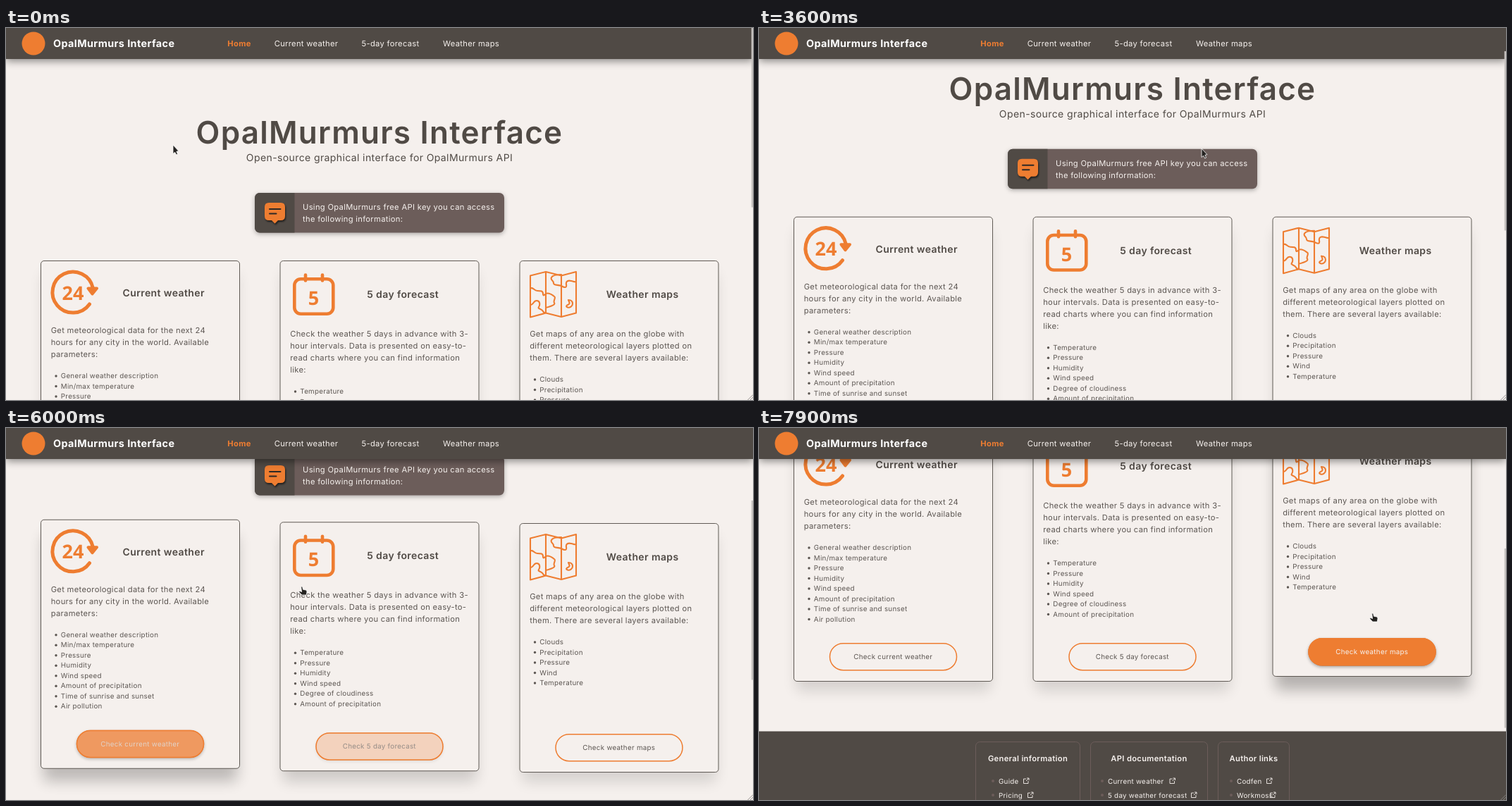
These frames come from a looping animation (1060x528 px, 8 s). An HTML page:

```html
<!DOCTYPE html>
<html lang="en">
<head>
<meta charset="utf-8">
<title>OpalMurmurs Interface</title>
<style>
html, body { margin: 0; width: 100%; height: 100%; overflow: hidden; background: #f5f0ed; }
svg { display: block; width: 1060px; height: 528px; font-family: Inter, "Open Sans", sans-serif; }
text { letter-spacing: .028em; text-rendering: geometricPrecision; white-space: pre; }
</style>
</head>
<body>
<svg id="stage" viewBox="0 0 1060 528"></svg>
<script>
const ORANGE = '#ee7d31', DARK = '#504a45', MID = '#6c5d5a', PAPER = '#f5f0ed', BODY = '#5d5753';
const NAME = 'OpalMurmurs';
const LOOP = 8000, STEP = 100;
const stage = document.getElementById('stage');

function el(parent, tag, attrs = {}, content) {
  const node = document.createElementNS('http://www.w3.org/2000/svg', tag);
  for (const k in attrs) node.setAttribute(k, attrs[k]);
  if (content !== undefined) node.textContent = content;
  parent.appendChild(node);
  return node;
}
const group = (parent, attrs) => el(parent, 'g', attrs);
const rect = (p, x, y, width, height, attrs) => el(p, 'rect', { x, y, width, height, ...attrs });
const path = (p, d, attrs) => el(p, 'path', { d, fill: 'none', ...attrs });
const text = (p, x, y, str, size, fill, attrs) =>
  el(p, 'text', { x, y, 'font-size': size, fill, ...attrs }, str);
const centred = (p, x, y, str, size, fill, weight = 400) =>
  text(p, x, y, str, size, fill, { 'text-anchor': 'middle', 'font-weight': weight });

const defs = el(stage, 'defs');
const blur = el(defs, 'filter', { id: 'blur', x: '-20%', y: '-20%', width: '140%', height: '140%' });
el(blur, 'feGaussianBlur', { stdDeviation: 10 });

// Page

rect(stage, 0, 0, 1060, 528, { fill: PAPER });
const page = group(stage);
centred(page, 530, 164, NAME + ' Interface', 44, DARK, 600);
centred(page, 530, 189, `Open-source graphical interface for ${NAME} API`, 14, DARK);

function drawNotice() {
  const g = group(page);
  rect(g, 353, 234, 354, 56.5, { rx: 7, fill: MID, style: 'filter:drop-shadow(0 2px 3px rgba(0,0,0,.3))' });
  path(g, 'M409.500 234H360a7 7 0 0 0-7 7v42.500a7 7 0 0 0 7 7h49.500z', { fill: DARK });
  path(g, 'M373 248h17q6 0 6 6v13q0 6-6 6h-4l-4.500 4.500-4.500-4.500h-4q-6 0-6-6v-13q0-6 6-6z',
    { fill: ORANGE, style: 'filter:drop-shadow(1px 2px 1px rgba(0,0,0,.6))' });
  path(g, 'M374 257h15.500M374 263.500h9.500', { stroke: '#2d2926', 'stroke-width': 2, 'stroke-linecap': 'round' });
  text(g, 421, 258, `Using ${NAME} free API key you can access`, 11.2, PAPER);
  text(g, 421, 275, 'the following information:', 11.2, PAPER);
}
drawNotice();

function clockIcon(g) {
  path(g, 'M123.300 369A29 29 0 1 0 118.500 392', { stroke: ORANGE, 'stroke-width': 5, 'stroke-linecap': 'round' });
  path(g, 'M116.500 369.500L129 369.500L122.500 377.500z',
    { fill: ORANGE, stroke: ORANGE, 'stroke-width': 4, 'stroke-linejoin': 'round' });
  digits(g, 95, '24', 385.5);
}
function calendarIcon(g) {
  rect(g, 409.3, 356.3, 55, 49.5, { rx: 9, fill: 'none', stroke: ORANGE, 'stroke-width': 4.6 });
  path(g, 'M425 350.500v8M449 350.500v8', { stroke: ORANGE, 'stroke-width': 4.6, 'stroke-linecap': 'round' });
  digits(g, 436.5, '5', 393);
}
function digits(g, x, str, y) {
  el(g, 'text', { x, y, 'text-anchor': 'middle', fill: ORANGE, 'font-size': 27, 'font-weight': 700,
    style: 'font-family:"Open Sans","Noto Sans",sans-serif;letter-spacing:0' }, str);
}
function mapIcon(g) {
  path(g, 'M744 351.500L766 346L788 351.500L809 346V404.500L788 410L766 404.500L744 410.500z' +
    'M766 346V404M788 352V410' +
    'M744 369c5-1 5 4 10 4s8 0 8 4 2 2 4 0c5-2 9 2 12 4s-2 6 0 9-5 5-12 7' +
    'M744 393c5 0 4-6 9-6s5 6 3 9 4 2 6 6 3 1 4 2' +
    'M788 350c-5 0-12 0-14 4s3 4 3 8 6 2 11 4' +
    'M788 366c5 3 8 3 7-2s3-6 7-5 5 2 7 1' +
    'M798 386c4 0 6 2 6 5.500s-4 6-7 5-2-3 1-4 1-4 0-6.500',
    { stroke: ORANGE, 'stroke-width': 2.1, 'stroke-linejoin': 'round', 'stroke-linecap': 'round' });
}

const cardData = [
  { x: 49, title: 'Current weather', titleY: 381, icon: clockIcon, bodyY: 433, listY: 497,
    body: ['Get meteorological data for the next 24', 'hours for any city in the world. Available', 'parameters:'],
    list: ['General weather description', 'Min/max temperature', 'Pressure', 'Humidity', 'Wind speed',
      'Amount of precipitation', 'Time of sunrise and sunset', 'Air pollution'],
    button: 'Check current weather' },
  { x: 388.5, title: '5 day forecast', titleY: 383, icon: calendarIcon, bodyY: 438, listY: 519,
    body: ['Check the weather 5 days in advance with 3-', 'hour intervals. Data is presented on easy-to-',
      'read charts where you can find information', 'like:'],
    list: ['Temperature', 'Pressure', 'Humidity', 'Wind speed', 'Degree of cloudiness', 'Amount of precipitation'],
    button: 'Check 5 day forecast' },
  { x: 728.5, title: 'Weather maps', titleY: 383, icon: mapIcon, bodyY: 438, listY: 502,
    body: ['Get maps of any area on the globe with', 'different meteorological layers plotted on',
      'them. There are several layers available:'],
    list: ['Clouds', 'Precipitation', 'Pressure', 'Wind', 'Temperature'],
    button: 'Check weather maps' }
];

function drawCard(c) {
  const g = group(page);
  const shade = rect(g, c.x + 4, 348, 275, 349, { rx: 6, filter: 'url(#blur)' });
  rect(g, c.x + .5, 330.5, 282, 353, { rx: 4.5, fill: PAPER, stroke: DARK, 'stroke-width': .9 });
  c.icon(g);
  centred(g, c.x + 174.7, c.titleY, c.title, 14, DARK, 600);
  c.body.forEach((s, i) => text(g, c.x + 14.7, c.bodyY + i * 17, s, 11.2, BODY));
  c.list.forEach((s, i) => {
    const y = c.listY + i * 14.5;
    el(g, 'circle', { cx: c.x + 22, cy: y - 3, r: 1.7, fill: BODY });
    text(g, c.x + 28.8, y, s, 9.8, BODY);
  });
  const box = { rx: 19, stroke: ORANGE, 'stroke-width': 1.5 };
  rect(g, c.x + 51.5, 629.7, 180, 38, { ...box, fill: 'none' });
  const fill = rect(g, c.x + 51.5, 629.7, 180, 38,
    { ...box, fill: ORANGE, style: 'filter:drop-shadow(0 2px 2px rgba(0,0,0,.3))' });
  const label = centred(g, c.x + 141.3, 652, c.button, 9.8, BODY);
  const lit = centred(g, c.x + 141.3, 652, c.button, 9.8, PAPER);
  return k => {
    g.setAttribute('transform', `translate(0 ${-7 * k})`);
    shade.setAttribute('opacity', .13 + .13 * k);
    shade.setAttribute('y', 348 + 6 * k);
    fill.setAttribute('opacity', k);
    label.setAttribute('opacity', 1 - k);
    lit.setAttribute('opacity', k);
  };
}
const cards = cardData.map(drawCard);

// Footer

function drawFooter() {
  const g = group(page, { transform: 'translate(0 324)' });
  rect(g, 0, 430.5, 1060, 300, { fill: DARK });
  const columns = [
    [307.5, 148, 'General information', [['Guide', 379], ['Pricing', 385]]],
    [470.5, 166, 'API documentation', [['Current weather', 586.5], ['5 day weather forecast', 617]]],
    [651.5, 101, 'Author links', [['Codfen', 724], ['Workmoss', 729]]]
  ];
  const textX = [340, 495, 678];
  columns.forEach(([x, w, title, links], n) => {
    rect(g, x, 445.5, w, 150, { rx: 6, fill: 'none', stroke: MID });
    centred(g, x + w / 2, 473, title, 11.2, PAPER, 600);
    links.forEach(([s, iconX], i) => {
      const y = 504.5 + i * 20;
      el(g, 'circle', { cx: textX[n] - 8, cy: y - 3.5, r: 2, fill: MID });
      text(g, textX[n], y, s, 9.8, PAPER);
      path(g, `M${iconX} ${y - 6.5}h-3.500v6.500h6.500v-3.500M${iconX} ${y - 3.500}l4-4m-3 0h3v3`,
        { stroke: PAPER, 'stroke-width': .9 });
    });
  });
}
drawFooter();

// Navigation bar

rect(stage, 0, 0, 1060, 44, { fill: DARK, style: 'filter:drop-shadow(0 3px 6px rgba(0,0,0,.45))' });
el(stage, 'circle', { cx: 39, cy: 22, r: 16.5, fill: ORANGE });
text(stage, 67, 27, NAME + ' Interface', 14.4, '#fff', { 'font-weight': 700 });

const tabs = [
  ['Home', 299, 363], ['Current weather', 363, 489], ['5-day forecast', 489, 602], ['Weather maps', 602, 718]
].map(([label, x, end], i) => {
  const g = group(stage);
  rect(g, x, 0, end - x, 44, { fill: MID });
  rect(g, x, 42.7, end - x, 1.5, { fill: PAPER });
  centred(stage, (x + end) / 2, 26, label, 11.2, i ? PAPER : ORANGE, i ? 400 : 700);
  return k => g.setAttribute('opacity', k);
});

const thumb = rect(stage, 1057.7, 0, 2.3, 254.5, { fill: '#c6c2c0' });
path(stage, 'M1052.500 528l7.500-7.500M1056 528l4-4', { stroke: '#8b8784', 'stroke-width': .9 });

// Pointer

const pointer = group(stage);
const ink = { fill: '#242220', stroke: '#fff', 'stroke-width': .8, 'stroke-linejoin': 'round' };
const arrow = path(pointer, 'M0 0V12.500L2.700 10.300L4.700 14L6.600 13L4.900 9.300L8 8.700z', ink);
const hand = path(pointer, 'M-1.300 .8Q-.3-.6 .8 .8L1.500 4.200L5.500 5Q7.200 5.500 7 7.500L6.300 12H-.2' +
  'L-4.300 7.800Q-4.300 6.300-2.800 6.600L-.4 7.600z', ink);

// Motion: each row is a time followed by values

const pointerKeys = [
  [0, 237, 166], [900, 333, 28], [1200, 335, 28], [1700, 490, 28], [1900, 545, 29], [2100, 548, 29],
  [2700, 655, 29], [3000, 655, 34], [3300, 632, 158], [3600, 628, 171], [3900, 620, 168], [4400, 250, 92],
  [4700, 207, 86], [5200, 202, 100], [5500, 192, 118], [5700, 205, 150], [6000, 420, 225],
  [6300, 612, 252], [6700, 612, 252], [6800, 644, 251], [6900, 704, 256], [7000, 790, 262],
  [7100, 862, 264], [7300, 862, 264], [7900, 871, 263]
];
const scrollKeys = [
  [0, 0], [3300, 0], [3600, 62.3], [4300, 62.3], [4700, 121], [4800, 124], [5200, 195],
  [7200, 195], [7900, 324]
];
const tabSpans = [[750, 1300], [1300, 1700], [1750, 2350], [2350, 3000]];
const cardSpans = [[5600, 5950], [5950, 6850], [6900, LOOP]];

function sample(keys, t) {
  let i = 0;
  while (i < keys.length - 2 && t >= keys[i + 1][0]) i++;
  const [a, b] = [keys[i], keys[i + 1]];
  const k = Math.min(1, (t - a[0]) / (b[0] - a[0]));
  return a.slice(1).map((v, n) => v + (b[n + 1] - v) * k);
}
const clamp = v => Math.max(0, Math.min(1, v));
const hover = ([start, end], t, ms) => clamp((t - start) / ms) * (1 - clamp((t - end) / ms));

function render(time) {
  const t = Math.floor(time % LOOP / STEP) * STEP;
  const [scroll] = sample(scrollKeys, t);
  const [x, y] = sample(pointerKeys, t);
  page.setAttribute('transform', `translate(0 ${-scroll})`);
  thumb.setAttribute('y', scroll * .528);
  tabs.forEach((set, i) => set(hover(tabSpans[i], t, 100)));
  cards.forEach((set, i) => set(hover(cardSpans[i], t, 200)));

  const onTab = y < 44 && x > 299 && x < 718;
  const onCard = t >= 5600 && cardData.some(c => x > c.x && x < c.x + 283);
  arrow.setAttribute('opacity', onTab || onCard ? 0 : 1);
  hand.setAttribute('opacity', onTab || onCard ? 1 : 0);
  pointer.setAttribute('transform', `translate(${x} ${y})`);
}

const begin = performance.now();
function tick() {
  render(performance.now() - begin);
  requestAnimationFrame(tick);
}
render(0);
tick();
</script>
</body>
</html>
```
